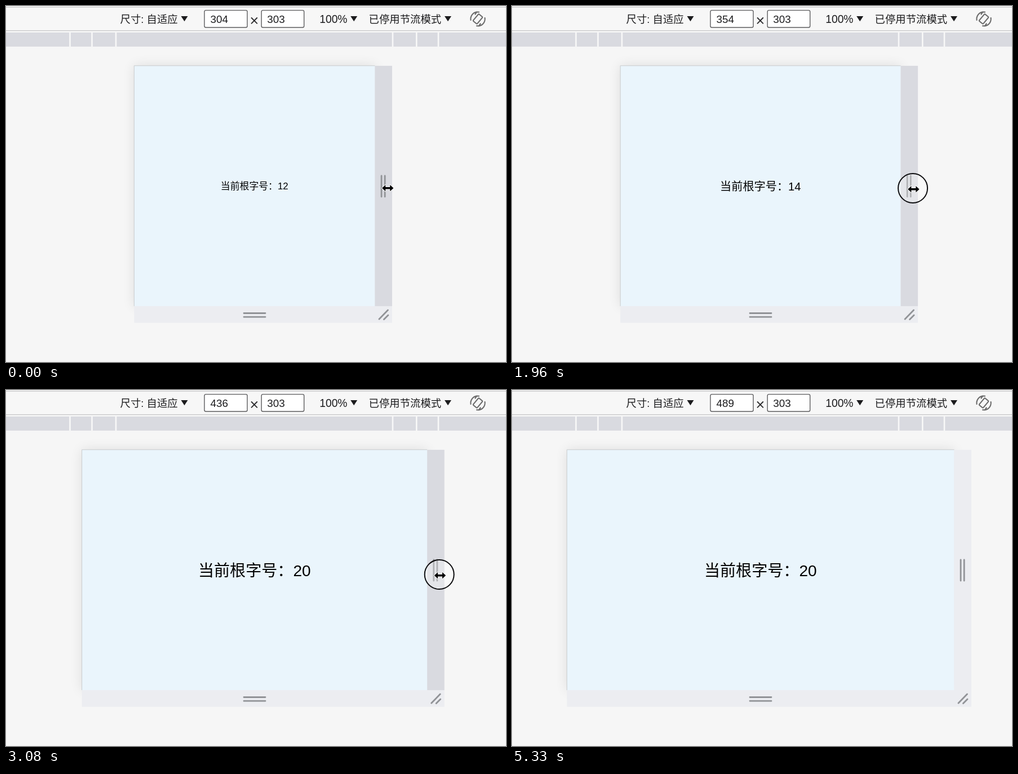
An HTML page for the animation above (5460 ms loop, 887 by 631 pixels).

```html
<!DOCTYPE html>
<html lang="zh-CN">
<head>
<meta charset="utf-8">
<title>Responsive root font size</title>
<style>
  html, body { margin: 0; width: 100%; height: 100%; overflow: hidden; background: #f6f6f6; }
  svg { display: block; width: 887px; height: 631px; }
  text { font-family: "Liberation Sans", "Noto Sans CJK SC", "Noto Sans CJK", sans-serif; fill: #1c1c1e; }
  .bar { font-size: 18.4px; }
  .grip { fill: none; stroke: #919397; stroke-width: 2.8; stroke-linecap: round; }
  .icon { fill: none; stroke: #6b6b6b; stroke-width: 2.1; stroke-linecap: round; stroke-linejoin: round; }
  .box { fill: #fff; stroke: #5c5c5e; stroke-width: 1.4; }
</style>
</head>
<body>
<svg viewBox="0 0 887 631">
  <defs>
    <filter id="blur" filterUnits="userSpaceOnUse" x="0" y="40" width="887" height="580">
      <feGaussianBlur stdDeviation="11"/>
    </filter>
  </defs>
  <rect width="887" height="631" fill="#f6f6f6"/>

  <rect id="shade" y="106" height="426" opacity=".1" filter="url(#blur)"/>
  <rect id="page" y="106" height="426" fill="#eaf5fc"/>
  <path id="edge" fill="none" stroke="#c9ccce"/>
  <text id="label" x="440.8" text-anchor="middle" style="fill:#000"></text>

  <rect id="foot" y="532" height="29.5" fill="#ecedf1"/>
  <path class="grip" d="M422 544.5H460M422 551.2H460"/>
  <g id="side">
    <rect id="strip" y="106" width="30.5" height="426"/>
    <path class="grip" d="M11.6 301V338M17.7 301V338M7.5 555L23 539M16 555.5L23.5 548"/>
  </g>

  <rect width="887" height="44" fill="#f7f7f7"/>
  <rect y="1.5" width="887" height="1.2" fill="#c4c4c6"/>
  <rect y="43" width="887" height="1.2" fill="#c4c4c6"/>
  <rect y="47" width="887" height="25" fill="#d9dae0"/>
  <path d="M113.5 47V72M152.5 47V72M195 47V72M686 47V72M728.3 47V72M767 47V72" stroke="#f8f8f8" stroke-width="2.6"/>
  <g class="bar">
    <text x="202.5" y="29.8">尺寸: 自适应</text>
    <text x="643.5" y="29.8">已停用节流模式</text>
    <text x="556.2" y="29.8" font-size="19.3">100%</text>
  </g>
  <path d="M310.5 18h12l-6 9.2zM611.2 18h12l-6 9.2zM778 18h12l-6 9.2z" fill="#1c1c1e"/>
  <rect class="box" x="352" y="7.6" width="76" height="30.4" rx="2.5"/>
  <rect class="box" x="453.2" y="7.6" width="75.5" height="30.4" rx="2.5"/>
  <text id="width" x="362.5" y="29.6" font-size="18.8"></text>
  <text x="463.3" y="29.6" font-size="18.8">303</text>
  <path d="M435 20.5l10.8 10.8M445.8 20.5l-10.8 10.8" stroke="#2c2c2e" stroke-width="1.9"/>
  <g class="icon" transform="translate(837 23)">
    <rect x="-4.6" y="-8" width="9.2" height="16" rx="1.6" transform="rotate(40)"/>
    <path d="M-12.5 2A12.6 12.6 0 0 1 -2 -12.4L2 -12.2M-2 -12.4L-4.6 -8.4"/>
    <path d="M12.5 -2A12.6 12.6 0 0 1 2 12.4L-2 12.2M2 12.4L4.6 8.4"/>
  </g>

  <circle id="ring" r="26" fill="#fff" fill-opacity=".28" stroke="#0c0c0e" stroke-width="2"/>
  <path id="cursor" d="M-10.2 0L-4 -5.8V-1.7H4V-5.8L10.2 0L4 5.8V1.7H-4V5.8Z"
        fill="#000" stroke="#fff" stroke-width="1.8" paint-order="stroke" stroke-linejoin="round"/>
</svg>
<script>
const LOOP = 5460, MID = 440.9, SCALE = 1.405;
const $ = id => document.getElementById(id);
const set = (id, attrs) => {
  for (const k in attrs) $(id).setAttribute(k, attrs[k]);
};
const clamp = (v, a = 0, b = 1) => Math.min(b, Math.max(a, v));
const ramp = (t, a, b) => clamp((t - a) / (b - a));
const smooth = p => p * p * (3 - 2 * p);

// piecewise linear value through [time, value] stops
function track(stops, t) {
  let [t0, v0] = stops[0];
  for (const [t1, v1] of stops) {
    if (t < t1) return v0 + (v1 - v0) * Math.max(0, (t - t0) / (t1 - t0 || 1));
    [t0, v0] = [t1, v1];
  }
  return v0;
}

const widths = [[670, 304], [1000, 314], [1500, 333], [1960, 354], [2420, 386], [2920, 423],
  [3080, 436], [3500, 471], [3880, 489], [4060, 492], [4120, 492], [4250, 489]];
const heights = [[670, 322.8], [1000, 322.8], [1960, 324.7], [2420, 327], [3080, 328.7], [3880, 331.5]];

function draw(t) {
  const w = Math.round(track(widths, t));
  const left = MID - w * SCALE / 2, right = MID + w * SCALE / 2, span = w * SCALE;
  const rem = clamp(12 + 8 * (w - 320) / 115, 12, 20), size = rem * SCALE;

  set("shade", { x: left, width: span });
  set("page", { x: left, width: span });
  set("edge", { d: `M${left} 532V105.8H${right}` });
  set("foot", { x: left, width: span + 30.5 });
  set("side", { transform: `translate(${right} 0)` });
  set("label", { y: 319.2 + size * .37, "font-size": size });
  $("label").textContent = "当前根字号：" + Math.round(rem);
  $("width").textContent = w;

  const away = smooth(ramp(t, 4790, 5290));
  const x = right + 22.8 + away * 40, y = track(heights, t) - away * 6;
  const press = smooth(ramp(t, 210, 500)) * (1 - smooth(ramp(t, 4750, 4960)));
  set("strip", { fill: x > right + 31 ? "#ecedf1" : "#d9dae0" });
  set("ring", { transform: `translate(${x - 1.3} ${y - 1.7}) scale(${.5 + press / 2})`, opacity: press });
  set("cursor", { transform: `translate(${x} ${y})`, opacity: 1 - ramp(t, 5080, 5290) });
}

function tick(now) {
  draw(now % LOOP);
  requestAnimationFrame(tick);
}
draw(0);
requestAnimationFrame(tick);
</script>
</body>
</html>
```
